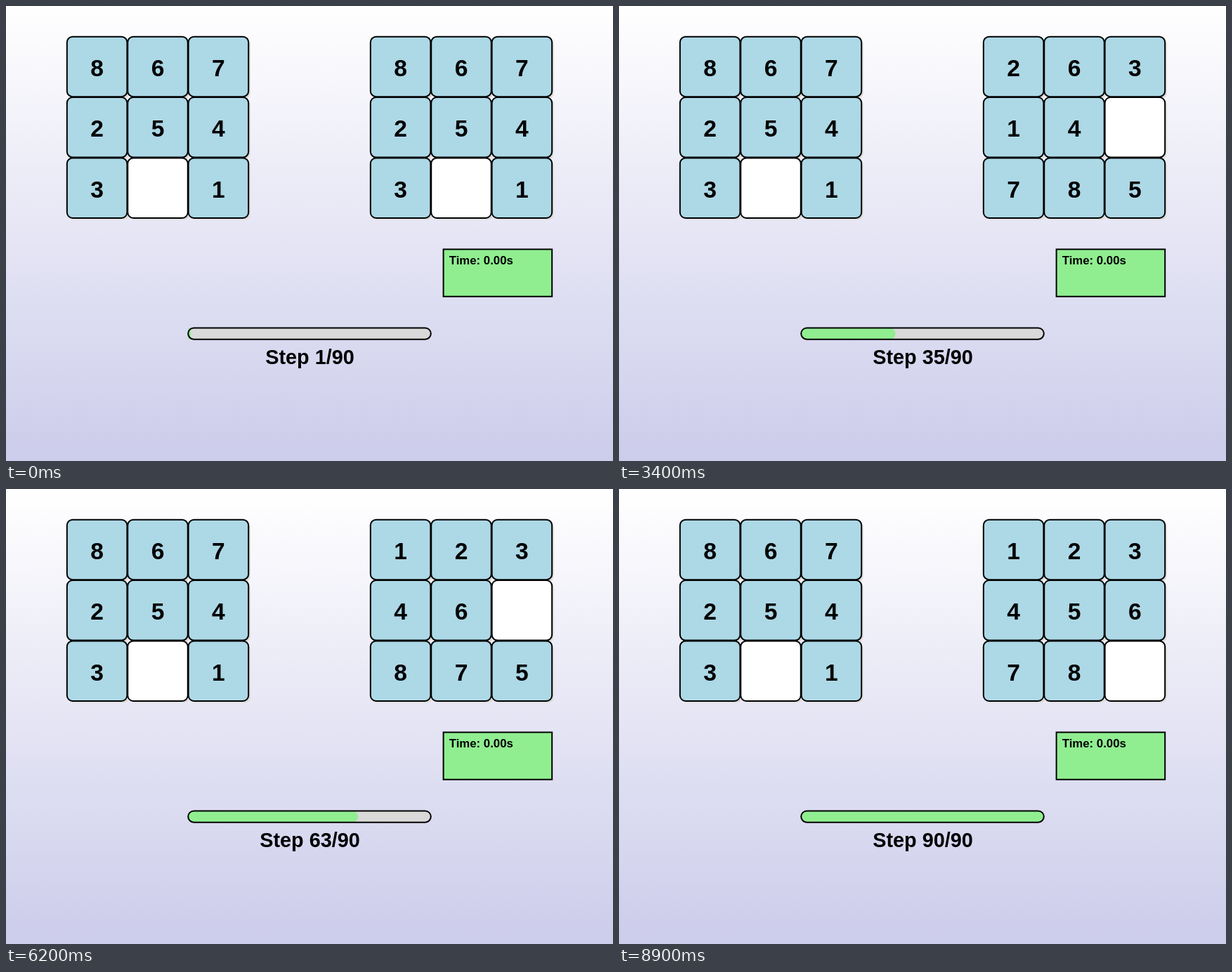
An HTML page with a canvas for the animation above (9 s loop, 864x648 px).

```html
<!DOCTYPE html>
<html lang="en">
<head>
<meta charset="utf-8">
<title>Sliding puzzle</title>
<style>
  html, body { margin: 0; width: 100%; height: 100%; overflow: hidden; }
  canvas { display: block; }
</style>
</head>
<body>
<canvas id="stage" width="864" height="648"></canvas>
<script>
const W = 864, H = 648, CELL = 86.4, STEP_MS = 100;
const ctx = document.getElementById('stage').getContext('2d');

// Positions the solution passes through: [board, moves since the last one]; 0 is the gap.
const START = '867254301', GOAL = '123456780';
const STOPS = [
  ['326185047', 15], ['263140785', 19], ['123608754', 13],
  ['123460875', 15], ['123076485', 10], [GOAL, 17]
];
const TOP_DONE = 40; // the top row stays solved from this move on

function distance(a, b) {
  let sum = 0;
  for (let i = 0; i < 9; i++) {
    if (a[i] === '0') continue;
    const j = b.indexOf(a[i]);
    sum += Math.abs(i % 3 - j % 3) + Math.abs((i / 3 | 0) - (j / 3 | 0));
  }
  return sum;
}

function neighbours(board) {
  const gap = board.indexOf('0'), x = gap % 3, y = gap / 3 | 0, out = [];
  for (const [dx, dy] of [[0, -1], [0, 1], [-1, 0], [1, 0]]) {
    const nx = x + dx, ny = y + dy;
    if (nx < 0 || nx > 2 || ny < 0 || ny > 2) continue;
    const cells = [...board], k = ny * 3 + nx;
    cells[gap] = cells[k];
    cells[k] = '0';
    out.push(cells.join(''));
  }
  return out;
}

// Extends the path by exactly `count` moves without repeating a board,
// preferring boards that are close to the goal.
function extend(path, target, count) {
  const walk = path.slice();
  let best = null, bestCost = Infinity;
  (function visit(left, cost) {
    const last = walk[walk.length - 1];
    if (left === 0) {
      if (last === target && cost < bestCost) {
        best = walk.slice();
        bestCost = cost;
      }
      return;
    }
    for (const next of neighbours(last)) {
      if (distance(next, target) > left - 1) continue;
      if (walk.length >= TOP_DONE && !next.startsWith('123')) continue;
      if (walk.includes(next)) continue;
      walk.push(next);
      visit(left - 1, cost + distance(next, GOAL));
      walk.pop();
    }
  })(count, 0);
  return best || path.concat(Array(count - 1).fill(path[path.length - 1]), target);
}

const boards = STOPS.reduce((path, [target, count]) => extend(path, target, count), [START]);
const total = boards.length;

function box(x, y, w, h, r, fill, stroke) {
  ctx.beginPath();
  ctx.roundRect(x, y, w, h, r);
  if (fill) {
    ctx.fillStyle = fill;
    ctx.fill();
  }
  if (stroke) {
    ctx.strokeStyle = '#000';
    ctx.lineWidth = 2;
    ctx.stroke();
  }
}

function text(str, x, y, size, align) {
  ctx.font = `bold ${size}px "Liberation Sans", Arial, sans-serif`;
  ctx.textAlign = align;
  ctx.fillStyle = '#000';
  ctx.fillText(str, x, y);
}

function drawBoard(board, left) {
  const size = CELL * 0.99, pad = (CELL - size) / 2;
  [...board].forEach((n, i) => {
    const x = left + i % 3 * CELL, y = 43.2 + (i / 3 | 0) * CELL;
    box(x + pad + 2.6, y + pad + 2.6, size, size, 8, '#dcdcda');
    box(x + pad, y + pad, size, size, 8, n === '0' ? '#fff' : '#add8e6', true);
    if (n !== '0') text(n, x + CELL / 2, y + 56.6, 33.6, 'center');
  });
}

function drawProgress(step) {
  const x = 259.2, y = 458.46, w = 345.6, h = 16.2, done = w * step / total;
  box(x, y, w, h, h / 2, '#d9d9d9');
  box(x, y, done, h, Math.min(h, done) / 2, '#90ee90');
  box(x, y, w, h, h / 2, null, true);
  text(`Step ${step}/${total}`, W / 2 + 0.5, 510, 28.8, 'center');
}

const sky = ctx.createLinearGradient(0, 0, 0, H);
sky.addColorStop(0, '#fff');
sky.addColorStop(1, '#cccceb');

function draw(index) {
  ctx.fillStyle = sky;
  ctx.fillRect(0, 0, W, H);
  drawBoard(START, CELL);
  drawBoard(boards[index], CELL * 6);
  box(622.6, 346.4, 154.6, 67.4, 0, '#90ee90', true);
  text('Time: 0.00s', 630.7, 368.3, 16.8, 'left');
  drawProgress(index + 1);
}

const begin = performance.now();
function tick() {
  const time = Math.max(0, performance.now() - begin);
  draw(Math.floor(time / STEP_MS) % total);
  requestAnimationFrame(tick);
}
tick();
</script>
</body>
</html>
```
